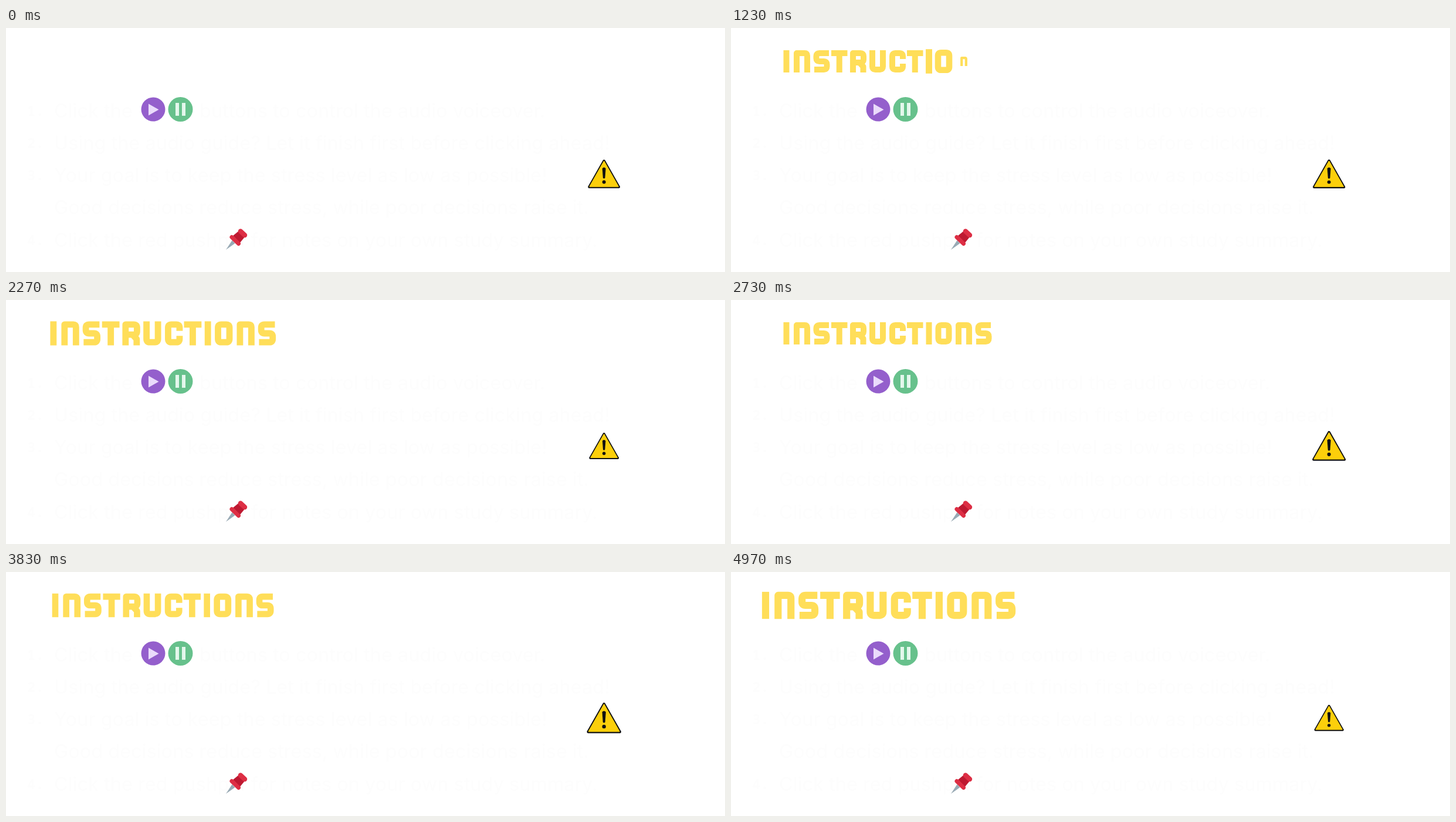
Animation of 1226 by 417 pixels, one loop 5010 ms. Source, as an HTML page:

```html
<!DOCTYPE html>
<html lang="en">
<head>
<meta charset="utf-8">
<title>Instructions</title>
<style>
  html, body { margin: 0; width: 100%; height: 100%; overflow: hidden; background: #fff; }
  svg { display: block; width: 1226px; height: 417px; }
  #title path { fill: none; stroke: #ffde59; stroke-width: 10; stroke-linejoin: round; }
  text { font: 32.5px Inter, "Open Sans", sans-serif; fill: #fdfdfd; }
  .num { font: bold 24px "Noto Sans Mono", monospace; }
</style>
</head>
<body>
<svg viewBox="0 0 1226 417">
  <g id="lines">
    <text class="num" x="36" y="150">1.</text>
    <text x="82" y="153">Click the</text>
    <text x="330" y="153">buttons to control the audio voiceover.</text>
    <text class="num" x="36" y="205">2.</text>
    <text x="82" y="208">Using the audio guide? Let it finish first before clicking ahead!</text>
    <text class="num" x="36" y="260">3.</text>
    <text x="82" y="263">Your goal is to keep the stress level as low as possible!</text>
    <text x="82" y="318">Good decisions reduce stress, while poor decisions raise it.</text>
    <text class="num" x="36" y="371">4.</text>
    <text x="82" y="374">Click the red pushpin</text>
    <text x="418" y="374">for notes on your own study summary.</text>
  </g>

  <g id="title" role="img" aria-label="Instructions"></g>

  <g id="play">
    <circle cx="251" cy="139" r="20.5" fill="#945fcc"/>
    <path d="M243 129.5V149.5L260.5 139.5Z" fill="#eadbfb"/>
  </g>
  <g id="pause">
    <circle cx="297.5" cy="139" r="21" fill="#67c18c"/>
    <path d="M289 128h6v22h-6zM300 128h6v22h-6z" fill="#e4f7ec"/>
  </g>

  <g id="warning" stroke-linejoin="round">
    <path d="M0 -22.5L25.5 22.5H-25.5Z" fill="#fccf0b" stroke="#111" stroke-width="4.4"/>
    <path d="M0 -21.7L24.6 21.7H-24.6Z" fill="#fccf0b" stroke="#fccf0b" stroke-width="1.6"/>
    <path d="M-3 -9.5Q0 -13 3 -9.5L1.8 7Q0 9 -1.8 7Z" fill="#111"/>
    <circle cy="14" r="3" fill="#111"/>
  </g>

  <g id="pin" stroke="#dd2e44" stroke-linecap="round">
    <path d="M375 379L385.5 363 390.5 368Z" fill="#99aab5" stroke="none"/>
    <path d="M387 355L398 346 408 356 399 367Z" fill="#be1931" stroke="none"/>
    <path d="M385 357.5L396.5 368.5" stroke-width="7"/>
    <path d="M400 347.5L407 354" stroke-width="8.5"/>
  </g>
</svg>

<script>
const LOOP = 5010, MID_X = 257.6, MID_Y = 57;

// Centre lines of the letters in a box 38 high
const glyphs = {
  I: "M5.5 0V38",
  N: "M5 38V5H19Q23 5 23 9V38",
  S: "M26.5 5H10Q5 5 5 10V14Q5 19 10 19H18Q23 19 23 24V28Q23 33 18 33H1.5",
  T: "M0 5H27.5M13.75 2V38",
  R: "M5 38V5H18Q23 5 23 10V16Q23 21 18 21H6M15 20L22.5 28V38",
  U: "M5 0V28Q5 33 10 33H18Q23 33 23 28V0",
  C: "M23 15V10Q23 5 18 5H10Q5 5 5 10V28Q5 33 10 33H18Q23 33 23 28V23",
  O: "M10 5H18Q23 5 23 10V28Q23 33 18 33H10Q5 33 5 28V10Q5 5 10 5Z"
};
const lefts = [89, 107, 140.5, 171, 203, 236, 270, 300, 332, 348.5, 383, 416.5];

const title = document.getElementById("title");
const warning = document.getElementById("warning");

const letters = [..."INSTRUCTIONS"].map((char, i) => {
  const path = document.createElementNS("http://www.w3.org/2000/svg", "path");
  path.setAttribute("d", glyphs[char]);
  title.append(path);
  const half = char === "I" ? 5.5 : 14;
  return { path, half, x: lefts[i] + half, start: 130 + 105 * i };
});

// Quick swell to 1, then a slower settling to 0
function pulse(t, peak, period) {
  const x = ((t - peak) / period % 1 + 1) % 1;
  return x < 2 / 3 ? (1 - 1.5 * x) ** 2 : (3 * x - 2) ** 0.75;
}

// Letter size: grows past 1, then falls back
function pop(t) {
  if (t <= 0) return 0;
  if (t < 200) return 1.18 * (1 - (1 - t / 200) ** 1.5);
  return Math.max(1, 1.18 - 0.18 * (t - 200) / 130);
}

function draw(t) {
  const size = 1 + 0.35 * pulse(t, 260, 1500);
  title.setAttribute("transform",
    `translate(${MID_X} ${MID_Y}) scale(${size}) translate(${-MID_X} ${-MID_Y})`);
  for (const { path, half, x, start } of letters) {
    const s = pop(t - start);
    path.setAttribute("visibility", s ? "visible" : "hidden");
    path.setAttribute("transform",
      `translate(${x} ${MID_Y}) scale(${s}) translate(${-half} -19)`);
  }
  const width = 47 + 15 * pulse(t, 180, 893);
  warning.setAttribute("transform", `translate(1019.7 249.4) scale(${width / 55.2})`);
}

const begin = performance.now();
function tick() {
  draw((performance.now() - begin) % LOOP);
  requestAnimationFrame(tick);
}
tick();
</script>
</body>
</html>
```
